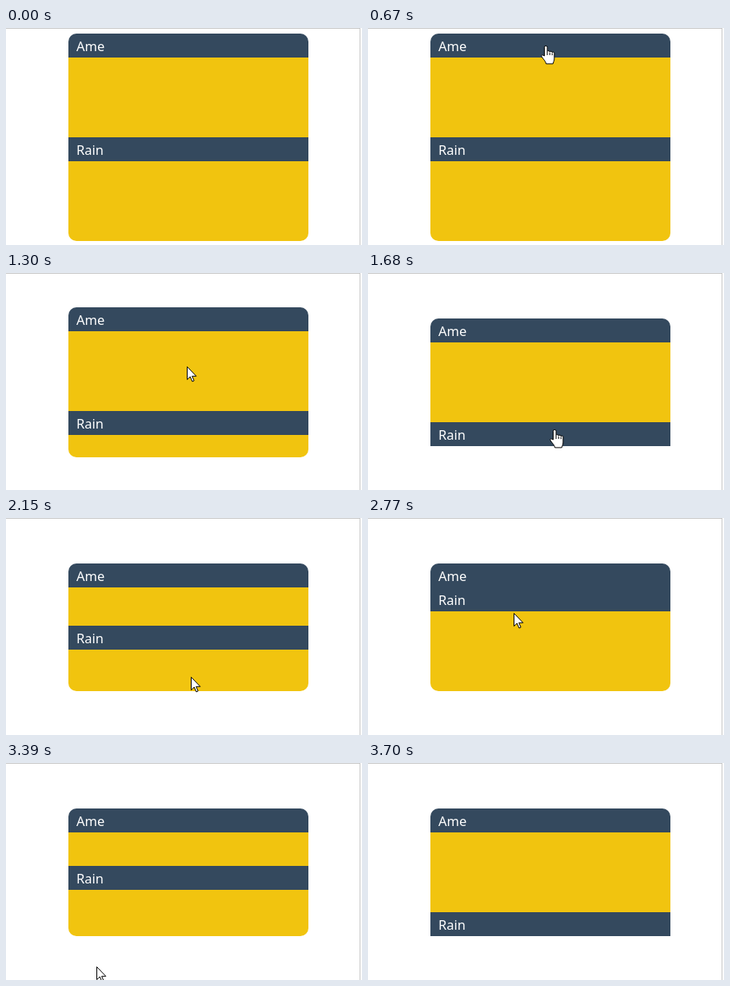
Recreate the animation shown at these times as an HTML page. Size 445x272 px, loop 4.09 s.

```html
<!DOCTYPE html>
<html lang="en">
<head>
<meta charset="utf-8">
<title>Accordion</title>
<style>
  html, body { margin: 0; width: 100%; height: 100%; overflow: hidden; background: #fff; }
  #stage { position: relative; width: 445px; height: 272px; overflow: hidden; }
  .edge { position: absolute; background: #c8c8c8; }
  .top { left: 0; top: 0; width: 443px; height: 1px; }
  .side { left: 442px; top: 0; width: 1px; height: 272px; }
  #card { position: absolute; left: 78px; width: 300px; }
  .head {
    box-sizing: border-box; height: 30px; padding-left: 10px; overflow: hidden;
    background: #34495e; color: #fff;
    font: 500 16.5px/31px "Noto Sans", "Open Sans", sans-serif;
  }
  .body { background: #f1c40f; }
  .head:first-child { border-radius: 10px 10px 0 0; }
  .body:last-child { border-radius: 0 0 10px 10px; }
  #click {
    position: absolute; left: 206px; top: 7px; width: 30px; height: 30px;
    border-radius: 50%; background: rgba(255, 255, 0, .47);
  }
  svg { position: absolute; left: 0; top: 0; overflow: visible; }
  #hand { left: -6px; top: -1px; }
  svg path { fill: #fff; stroke: #000; stroke-linejoin: round; }
  svg .line { fill: none; }
</style>
</head>
<body>
<div id="stage">
  <div class="edge top"></div>
  <div class="edge side"></div>
  <div id="card">
    <div class="head">Ame</div><div class="body" id="one"></div>
    <div class="head">Rain</div><div class="body" id="two"></div>
  </div>
  <div id="click"></div>
  <svg id="arrow" width="13" height="20">
    <path d="M.5 .5V16.6L4.3 13l2.6 6 2.2-1-2.5-5.7h5.2z"/>
  </svg>
  <svg id="hand" width="18" height="24">
    <path d="M4.5 13V2.2a1.8 1.8 0 0 1 3.6 0V7.6a1.6 1.6 0 0 1 3.1.4a1.6 1.6 0 0 1 3 .7a1.5 1.5 0 0 1 2.7.9V16c0 3-1 4-1.7 6.9H6.7C6 19.5 3 17 1 13.8c-.8-1.6.8-2.6 2-1.6z"/>
    <path class="line" d="M8.1 8v4M11.2 8.6v3.4M14.2 9.4v2.8"/>
  </svg>
</div>
<script>
const LOOP = 4090, START = 205, TICK = 77.5, SLIDE = 500;
const CLOSE_TWO = 927.5, OPEN_TWO = 1882.5, OPEN_ONE = 3172.5;

// Each visit of the pointer: a few stops as [tick, x, y], eased between.
const visits = [
  [[0, 91, 188], [2, 162, 66]],
  [[5, 227, 12], [6, 222, 23], [11, 222, 23], [16, 228, 168],
   [19, 233, 197], [25, 231, 199], [28, 208, 263]],
  [[31, 197, 253], [33, 182, 119], [37, 122, 71], [38, 121, 58], [41, 113, 255]]
];

const $ = id => document.getElementById(id);
const show = (el, on) => { el.style.display = on ? "block" : "none"; };
const slide = (t, from) => Math.min(1, Math.max(0, (t - from) / SLIDE));
const ease = u => u * u * (3 - 2 * u);

function pointer(tick) {
  const stops = visits.find(v => tick >= v[0][0] && tick <= v[v.length - 1][0]);
  if (!stops) return null;
  const i = Math.max(1, stops.findIndex(s => s[0] >= tick));
  const [a, b] = [stops[i - 1], stops[i]];
  const u = ease((tick - a[0]) / (b[0] - a[0]));
  return [1, 2].map(n => Math.round(a[n] + (b[n] - a[n]) * u));
}

function draw(time) {
  // The picture refreshes in even ticks.
  const tick = Math.floor((time - START) / TICK);
  const t = START + tick * TICK;

  const one = Math.round(100 * (1 - slide(t, OPEN_TWO) + slide(t, OPEN_ONE)));
  const two = t < OPEN_TWO ? Math.round(100 * (1 - slide(t, CLOSE_TWO))) : 100 - one;
  const top = Math.round(137 - (60 + one + two) / 2);
  $("card").style.top = top + "px";
  $("one").style.height = one + "px";
  $("two").style.height = two + "px";

  show($("click"), t > CLOSE_TWO - 110 && t < CLOSE_TWO);

  const at = pointer(tick);
  const inHead = y => at && at[1] >= y && at[1] < y + 30;
  const onHead = inHead(top) || inHead(top + 30 + one);
  show($("arrow"), at && !onHead);
  show($("hand"), at && onHead);
  if (at) {
    const move = `translate(${at[0]}px, ${at[1]}px)`;
    $("arrow").style.transform = $("hand").style.transform = move;
  }
}

const begin = performance.now();
function frame() {
  draw((performance.now() - begin) % LOOP);
  requestAnimationFrame(frame);
}
frame();
</script>
</body>
</html>
```
